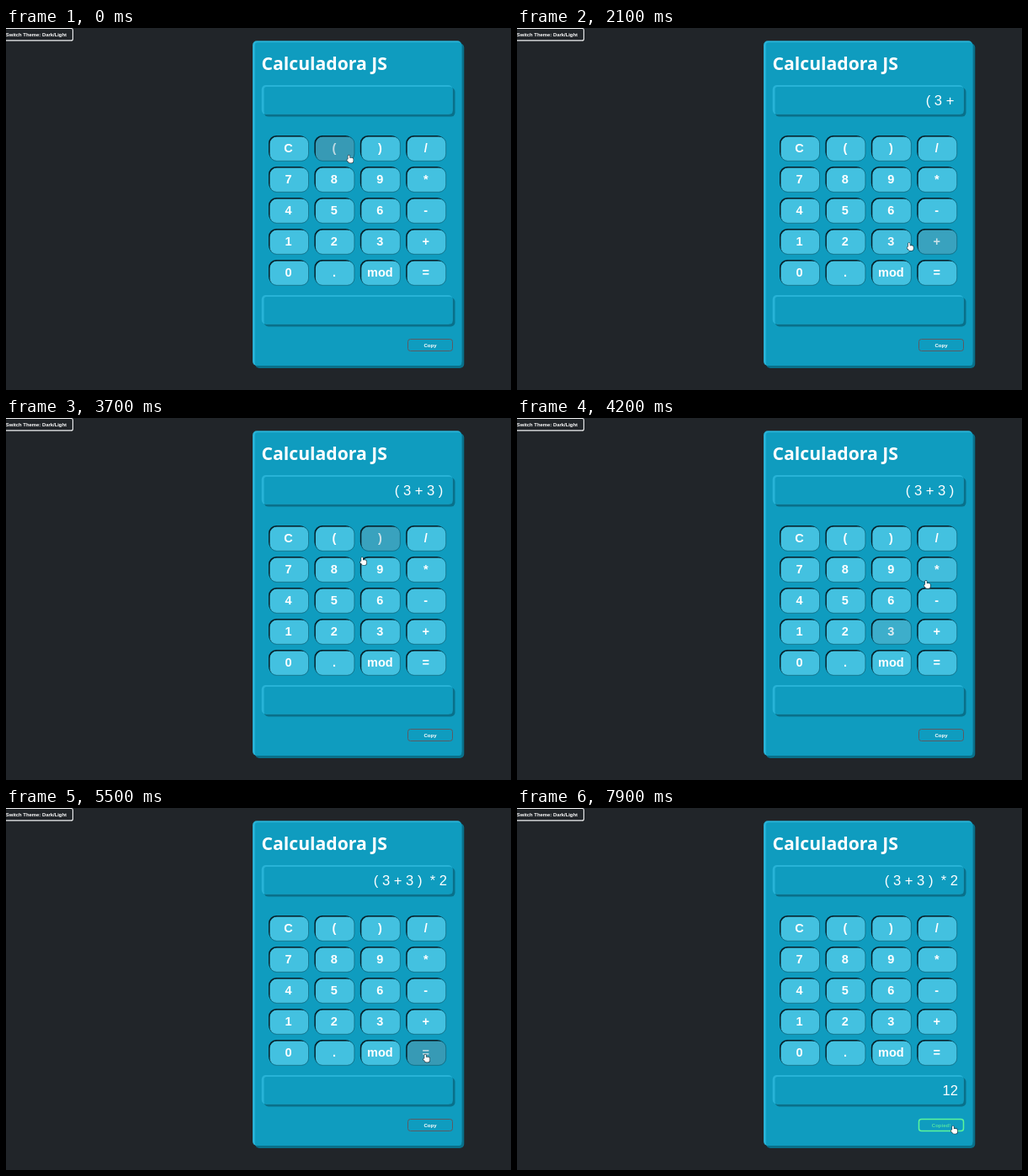
Write an HTML page with a canvas that moves like this. It is 600 by 431 pixels and loops after 8000 ms.

```html
<!DOCTYPE html>
<html lang="pt">
<head>
<meta charset="utf-8">
<title>Calculadora JS</title>
<style>
  html, body { margin: 0; width: 100%; height: 100%; overflow: hidden; background: #212529; }
  canvas { display: block; width: 600px; height: 431px; }
</style>
</head>
<body>
<canvas id="stage" width="600" height="431"></canvas>
<script>
const ctx = document.getElementById('stage').getContext('2d');
const LOOP = 8000, STEP = 100, FADE = 200, CLICK_DELAY = 200;
const CARD = '#0f9cbf', LIGHT = '#28b3d7', DARK = '#09708a';
const SANS = '"Liberation Sans", Arial, sans-serif';

const labels = 'C ( ) / 7 8 9 * 4 5 6 - 1 2 3 + 0 . mod ='.split(' ');
const keys = labels.map((label, i) => ({
  label, x: 312 + (i % 4) * 54.4, y: 128 + Math.floor(i / 4) * 37, w: 48, h: 30.8
}));
const copyKey = { label: 'Copy', x: 477.5, y: 370.5, w: 53, h: 14 };
const targets = [...keys, copyKey];

// Where the pointer rests: key, arrival, departure, offset from the key's centre, typed text
const stops = [
  ['(', 600, 800, 17, 8, '( '],
  ['mod', 1060, 1200, 12, -7, ''],
  ['3', 1400, 1700, 2, 2, '3'],
  ['+', 1800, 1980, -4, 2, ' + '],
  ['3', 2180, 2600, 5, 1, '3'],
  [')', 3100, 3600, -22, 6, ' ) '],
  ['3', 4000, 4050, -20, 0, ''],
  ['*', 4250, 4500, -2, 2, ' * '],
  ['2', 4750, 5200, 10, 2, '2'],
  ['=', 5350, 6550, -1, 2, ''],
  ['Copy', 7400, LOOP, 14, 1, '']
].map(([label, arrive, leave, dx, dy, typed]) => {
  const key = targets.find(k => k.label === label);
  return { key, arrive, leave, typed, x: key.x + key.w / 2 + dx, y: key.y + key.h / 2 + dy };
});
const clicked = (stop, t) => t >= stop.arrive + CLICK_DELAY;
const clickedKey = (label, t) => stops.some(s => s.key.label === label && clicked(s, t));

const ease = k => k * k * (3 - 2 * k);
const lerp = (a, b, k) => a + (b - a) * k;

function pointer(t) {
  const i = stops.findIndex(s => t <= s.leave);
  const to = stops[i], from = stops[Math.max(0, i - 1)];
  const k = t >= to.arrive || i === 0 ? 1 : ease((t - from.leave) / (to.arrive - from.leave));
  return { x: lerp(from.x, to.x, k), y: lerp(from.y, to.y, k), near: [from.key, to.key] };
}

const inside = (r, p) => p.x >= r.x && p.x <= r.x + r.w && p.y >= r.y && p.y <= r.y + r.h;

// Share of the last moments the pointer spent over the key: a linear fade
function hover(key, t) {
  const samples = 10;
  let hits = 0;
  for (let i = 0; i < samples; i++) {
    const p = pointer(t - i * FADE / samples);
    if (p.near.includes(key) && inside(key, p)) hits++;
  }
  return hits / samples;
}

const mix = (a, b, k) => `rgb(${a.map((v, i) => Math.round(lerp(v, b[i], k)))})`;

function round(x, y, w, h, r) {
  ctx.beginPath();
  ctx.roundRect(x, y, w, h, r);
}

function fillRound(x, y, w, h, r, color) {
  round(x, y, w, h, r);
  ctx.fillStyle = color;
  ctx.fill();
}

function strokeRound(x, y, w, h, r, color, width) {
  round(x, y, w, h, r);
  ctx.strokeStyle = color;
  ctx.lineWidth = width;
  ctx.stroke();
}

function text(str, x, y, font, color, align = 'center') {
  ctx.font = font;
  ctx.fillStyle = color;
  ctx.textAlign = align;
  ctx.fillText(str, x, y);
}

// Panel with a light top-left edge and a shadow shifted down right
function panel(x, y, w, h) {
  fillRound(x + 3, y + 3, w - 3, h - 3, 5, DARK);
  fillRound(x, y, w - 3, h - 3, 5, LIGHT);
  fillRound(x + 2.8, y + 2, w - 5.8, h - 5, 3, CARD);
}

function drawKey(key, t) {
  const k = hover(key, t), { x, y, w, h } = key;
  fillRound(x, y, w - 2, h - 2, 9, '#06202a');
  fillRound(x + 1.4, y + 1.4, w - 2, h - 2, 8.5, mix([67, 193, 224], [55, 154, 181], k));
  strokeRound(x + 1, y + 1, w - 1.5, h - 1.5, 8.5, 'rgba(6, 40, 52, 0.55)', 0.7);
  text(key.label, x + w / 2 - 0.5, y + 20.3, `bold 14.5px ${SANS}`, mix([255, 255, 255], [190, 217, 226], k));
}

function drawCopy(t) {
  const done = clickedKey('Copy', t), { x, y, w, h } = copyKey;
  strokeRound(x, y, w, h, 3, done ? '#5cf59a' : '#5c5a62', done ? 1.5 : 1);
  text(done ? 'Copied!' : 'Copy', 504, 379.8, `bold 6px ${SANS}`, done ? '#52e0a2' : '#fff');
}

const hand = new Path2D();
hand.roundRect(-0.9, 0, 1.8, 7, 0.9);
hand.roundRect(-0.9, 3.4, 6, 5.8, [0, 1.5, 2, 2]);
hand.roundRect(-2.2, 4.8, 2.4, 2.4, 1);
const arrow = new Path2D('M0 0V7L1.7 5.6L3 8L3.9 7.5L2.8 5.2H4.8Z');

function drawPointer(t) {
  const p = pointer(t);
  const shape = targets.some(key => inside(key, p)) ? hand : arrow;
  ctx.save();
  ctx.translate(p.x, p.y);
  ctx.lineWidth = 1.2;
  ctx.strokeStyle = '#20343c';
  ctx.fillStyle = '#fff';
  ctx.stroke(shape);
  ctx.fill(shape);
  ctx.restore();
}

function draw(t) {
  ctx.fillStyle = '#212529';
  ctx.fillRect(0, 0, 600, 431);

  strokeRound(-4, 0.5, 83.4, 14.4, 2, '#f4f5f6', 1.1);
  text('Switch Theme: Dark/Light', -0.3, 9.8, `bold 5.9px ${SANS}`, '#fff', 'left');

  panel(293, 15.3, 251.3, 389.7);
  text('Calculadora JS', 303.5, 50, 'bold 21.2px "Noto Sans", "Open Sans", sans-serif', '#fff', 'left');
  panel(303.7, 68, 229.8, 37.6);
  panel(303.7, 318, 229.8, 37.4);
  keys.forEach(key => drawKey(key, t));
  drawCopy(t);

  const entry = stops.filter(s => clicked(s, t)).map(s => s.typed).join('');
  text(entry, 524, 92, `16.6px ${SANS}`, '#fff', 'right');
  if (clickedKey('=', t)) text('12', 524, 341.5, `16.6px ${SANS}`, '#fff', 'right');

  drawPointer(t);
}

const start = performance.now();
function tick() {
  const t = (performance.now() - start) % LOOP;
  draw(Math.floor(t / STEP) * STEP);
  requestAnimationFrame(tick);
}
tick();
</script>
</body>
</html>
```
